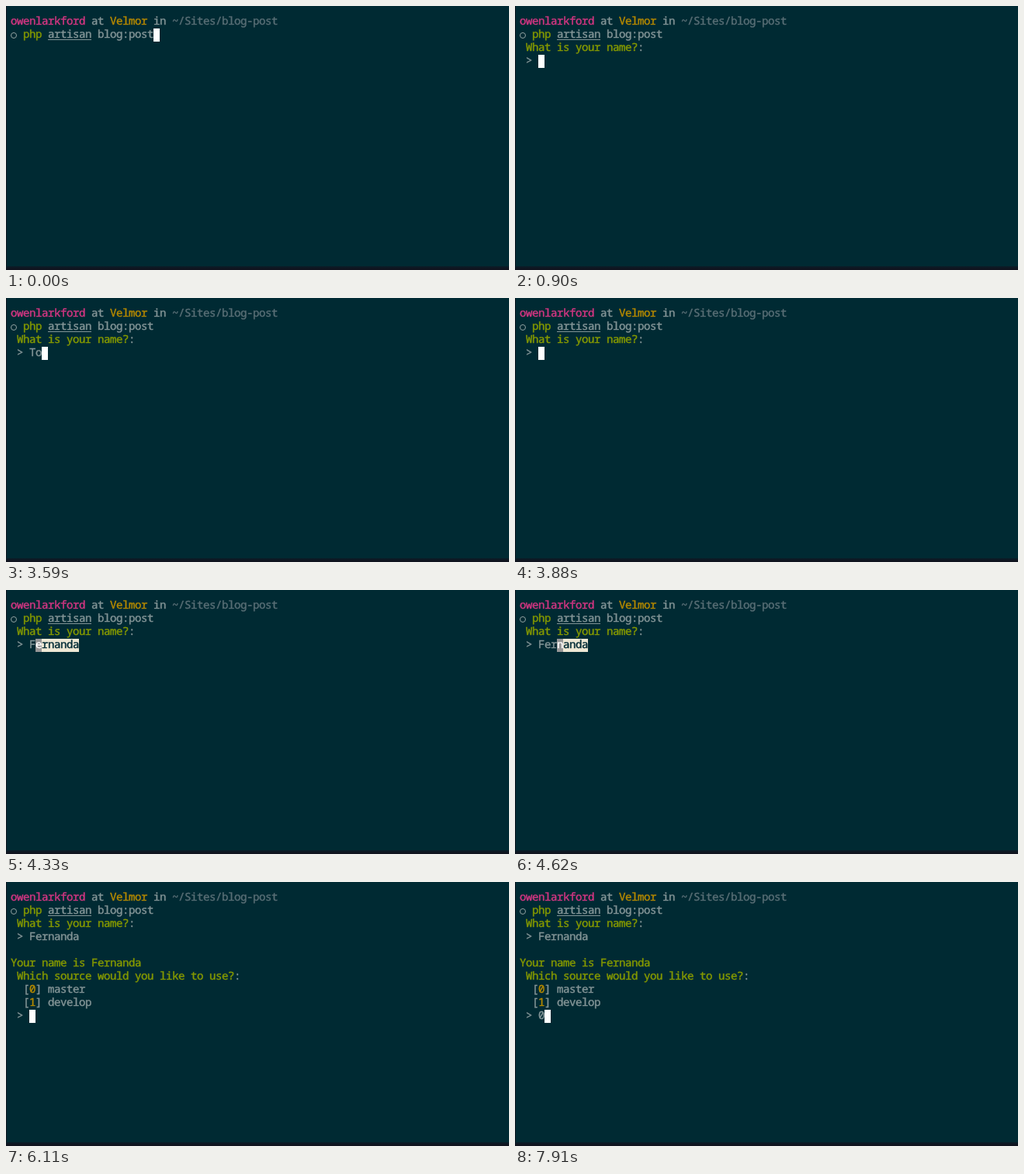
An HTML page for the animation above (8000 ms loop, 648 by 341 pixels).

```html
<!DOCTYPE html>
<html lang="en">
<head>
<meta charset="utf-8">
<title>Terminal prompt</title>
<style>
  html, body { margin: 0; width: 100%; height: 100%; overflow: hidden; background: #002a33; }

  .term {
    position: absolute; left: 0; top: 0; width: 648px; height: 341px; overflow: hidden;
    background: #002a33; color: #839496;
    font: 500 14px/15px "Noto Sans Mono", "DejaVu Sans Mono", monospace;
    letter-spacing: calc(8px - 1ch);
    -webkit-text-stroke: 0.45px;
    font-variant-ligatures: none; text-rendering: geometricPrecision;
  }
  .left, .bottom { position: absolute; left: 0; background: #0d1720; }
  .left { top: 0; width: 1px; height: 341px; }
  .bottom { top: 336px; width: 648px; height: 5px; background: linear-gradient(#08202a, #10141f 60%); }

  /* text rows: 17px tall, cells 8px wide */
  .rows { position: absolute; left: 6px; width: 636px; }
  .rows div { height: 17px; white-space: pre; }
  .pink { color: #d33682; }
  .gold { color: #b58900; }
  .green { color: #859900; }
  .dim { color: #586e75; }
  u {
    display: inline-block; height: 17px; vertical-align: top; text-decoration: none;
    background: linear-gradient(#839496, #839496) 0 14px / 100% 1px no-repeat;
  }
  .ring {
    display: inline-block; box-sizing: border-box; width: 8px; height: 8px;
    margin-top: 5px; vertical-align: top;
    border: 1.5px solid #93a1a1; border-radius: 50%;
  }

  .slot { position: absolute; left: 0; top: 63px; width: 648px; height: 17px; overflow: hidden; }
  .strip { top: 0; animation: typing 8s step-end infinite; }
  .hint {
    display: inline-block; height: 17px; vertical-align: top;
    background: #eee8d5; color: #002b36;
  }
  .on { color: #fff; }
  .off { color: #002b36; }

  .cursor {
    position: absolute; width: 8px; height: 17px; left: 190px; top: 29px;
    background: #fff; animation: cursor 8s step-end infinite;
  }
  .ask { animation: ask 8s step-end infinite; }
  .reply { animation: reply 8s step-end infinite; }
  .pick { animation: pick 8s step-end infinite; }

  @keyframes ask { 0% { visibility: hidden; } 11.25%, 100% { visibility: visible; } }
  @keyframes reply { 0% { visibility: hidden; } 76.375%, 100% { visibility: visible; } }
  @keyframes pick { 0% { visibility: hidden; } 98.875%, 100% { visibility: visible; } }

  @keyframes typing {
    0% { top: 0; }
    11.25% { top: -17px; }
    37.5% { top: -34px; }
    41.25% { top: -51px; }
    44.875% { top: -68px; }
    46.75% { top: -85px; }
    48.5% { top: -17px; }
    54.125% { top: -102px; }
    55.875% { top: -119px; }
    57.75% { top: -136px; }
    67.125%, 100% { top: -153px; }
  }

  @keyframes cursor {
    0% { left: 190px; top: 29px; background: #fff; }
    7.5% { left: 6px; top: 46px; background: #fff; }
    11.25% { left: 30px; top: 63px; background: #fff; }
    37.5% { left: 38px; top: 63px; background: #969696; }
    41.25% { left: 46px; top: 63px; background: #fff; }
    46.75% { left: 38px; top: 63px; background: #fff; }
    48.5% { left: 30px; top: 63px; background: #fff; }
    54.125% { left: 38px; top: 63px; background: #969696; }
    55.875% { left: 46px; top: 63px; background: #969696; }
    57.75% { left: 54px; top: 63px; background: #969696; }
    67.125% { left: 94px; top: 63px; background: #fff; }
    76.375% { left: 30px; top: 165px; background: #fff; }
    98.875%, 100% { left: 38px; top: 165px; background: #fff; }
  }
</style>
</head>
<body>
<div class="term">
  <div class="left"></div>
  <div class="bottom"></div>
  <div class="cursor"></div>

  <div class="rows" style="top:12px">
    <div><span class="pink">owenlarkford</span> at <span class="gold">Velmor</span> in <span class="dim">~/Sites/blog-post</span></div>
    <div><i class="ring"></i> <span class="green">php</span> <u>artisan</u> blog:post</div>
    <div class="ask"> <span class="green">What is your name?</span>:</div>
  </div>

  <div class="slot">
    <div class="rows strip">
      <div></div>
      <div> &gt; </div>
      <div> &gt; T<span class="on">o</span><span class="hint">m</span></div>
      <div> &gt; To<span class="off">m</span></div>
      <div> &gt; To</div>
      <div> &gt; T</div>
      <div> &gt; F<span class="on">e</span><span class="hint">rnanda</span></div>
      <div> &gt; Fe<span class="on">r</span><span class="hint">nanda</span></div>
      <div> &gt; Fer<span class="on">n</span><span class="hint">anda</span></div>
      <div> &gt; Fernanda</div>
    </div>
  </div>

  <div class="rows reply" style="top:97px">
    <div class="green">Your name is Fernanda</div>
    <div> <span class="green">Which source would you like to use?</span>:</div>
    <div>  [<span class="gold">0</span>] master</div>
    <div>  [<span class="gold">1</span>] develop</div>
    <div> &gt; <span class="pick">0</span></div>
  </div>
</div>
</body>
</html>
```
